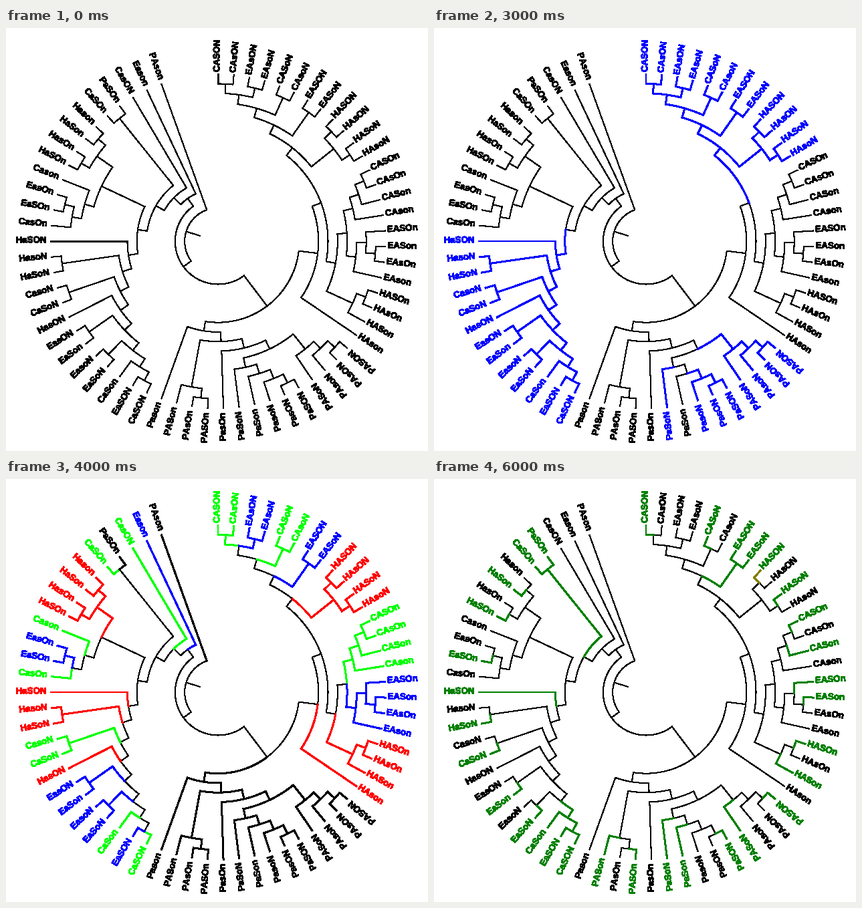
These frames come from a looping animation (631 by 633 pixels, 7000 ms). A matplotlib script:

```python
import matplotlib as mpl
import matplotlib.pyplot as plt
import numpy as np
from matplotlib.animation import FuncAnimation
from matplotlib.patches import PathPatch
from matplotlib.textpath import TextPath
from matplotlib.transforms import Affine2D

W, H, DPI = 631, 633, 100
CX, CY = 317.2, 319.2
TIP = 250            # radius of the leaf tips
LEVEL = 200 / 14     # radial distance between tree levels
STEP = 5.4           # degrees between leaves
FONT = {"family": "Liberation Sans", "weight": "bold"}
BLACK, RED, BLUE = "#000000", "#ff0000", "#0000ff"
LIME, GREEN, OLIVE = "#00ff00", "#008000", "#808000"
HOLD = [0, 0, 1, 2, 3, 4, 5]   # colouring shown in each second

mpl.rcParams["text.kerning_factor"] = 6

UPPER = ("(((((CASON,CAsON),(EAsON,EAsoN)),(CASoN,CAsoN)),(EASON,EASoN)),"
         "((HASON,HAsON),(HASoN,HAsoN)))")
RIGHT = ("(((((CASOn,CAsOn),CASon),CAson),((EASOn,(EASon,EAsOn)),EAson)),"
         "((HASOn,HAsOn),HASon))")
LOWER = ("(((((PASON,PAsON),PAsoN),PASoN),"
         "((((PaSON,PasON),PasoN),PaSon),PaSoN)),PasOn)")
BOTTOM = f"(({LOWER},((PASOn,PAsOn),PASon)),Pason)"
LEFT = ("((((((((CaSON,EaSON),CaSon),(EaSoN,EasoN)),(EaSon,EasON)),HasON),"
        "(CaSoN,CasoN)),(HaSoN,HasoN)),HaSON)")
OUTER = "(((CasOn,(EaSOn,EasOn)),Cason),((HaSOn,HasOn),(HaSon,Hason)))"
REST = f"(((({LEFT},{OUTER}),(CaSOn,PaSOn)),CasON),Eason)"
TREE = f"((((({UPPER},{RIGHT}),HAson),{BOTTOM}),{REST}),PAson)"


class Node:
    def __init__(self, kids=(), name=None, angle=0):
        self.kids = kids
        self.angle = angle
        self.level = 0
        self.names = [name]
        if kids:
            self.angle = (kids[0].angle + kids[-1].angle) / 2
            self.level = 1 + max(k.level for k in kids)
            self.names = [n for k in kids for n in k.names]
        self.radius = TIP - LEVEL * self.level


def parse(text):
    """Read a bracketed tree; returns its root and its leaves in order."""
    stack, leaves, word = [[]], [], ""
    for ch in text:
        if ch in "(),":
            if word:
                leaf = Node(name=word, angle=STEP * len(leaves))
                leaves.append(leaf)
                stack[-1].append(leaf)
                word = ""
            if ch == "(":
                stack.append([])
            elif ch == ")":
                kids = stack.pop()
                stack[-1].append(Node(kids))
        else:
            word += ch
    return stack[0][0], leaves


def polar(radius, deg):
    a = np.radians(deg)
    return CX + radius * np.sin(a), CY - radius * np.cos(a)


def leaf_color(state, name):
    if state == 1:
        return RED if name[1] == "a" else BLUE
    if state == 2:
        marked = name[-1] == "N" and name != "CasON"
        return BLUE if marked or name in ("CaSon", "EaSon") else None
    if state == 3:
        return {"C": LIME, "E": BLUE, "H": RED, "P": BLACK}[name[0]]
    if state == 4:
        return RED if "O" in name else None
    if state == 5:
        return GREEN if "S" in name else None
    return None


def clade_color(state, node):
    colors = {leaf_color(state, n) for n in node.names}
    return colors.pop() if len(colors) == 1 else None


fig = plt.figure(figsize=(W / DPI, H / DPI), dpi=DPI, facecolor="white")
ax = fig.add_axes([0, 0, 1, 1])
ax.set_xlim(0, W)
ax.set_ylim(H, 0)
ax.axis("off")


def px(width):
    return width * 72 / DPI


def stroke(radius, deg):
    x, y = polar(radius, deg)
    return ax.plot(x, y, color=BLACK, lw=px(1.05), antialiased=False,
                   solid_capstyle="projecting", solid_joinstyle="miter")[0]


def label(leaf, outward):
    path = TextPath((0, 0), leaf.names[0], size=13.33, prop=FONT)
    shift = 0 if outward else -path.get_extents().x1
    x, y = polar(253.3 if outward else 257.6, leaf.angle)
    turn = leaf.angle + (-90 if outward else 90)
    place = (Affine2D().translate(shift, -2).scale(1, -1)
             .rotate_deg(turn).translate(x, y))
    return ax.add_patch(PathPatch(path.transformed(place), lw=0,
                                  fc=BLACK, antialiased=False))


root, leaves = parse(TREE)
edges = []


def grow(node):
    for kid, other in zip(node.kids, node.kids[::-1]):
        spoke = stroke(np.array([node.radius, kid.radius]),
                       np.array([kid.angle, kid.angle]))
        sweep = np.linspace(kid.angle, node.angle, 60)
        arc = stroke(node.radius, sweep)
        edges.append((kid, other, node, spoke, arc))
        grow(kid)


grow(root)
stroke(np.array([28.5, root.radius]), np.array([root.angle, root.angle]))
labels = [(leaf.names[0], label(leaf, i < 24)) for i, leaf in enumerate(leaves)]


def paint(line, color, width):
    line.set_color(color or BLACK)
    line.set_linewidth(px(width if color else 1.05))
    line.set_zorder(3 if color else 2)


def update(frame):
    state = HOLD[frame]
    for kid, other, parent, spoke, arc in edges:
        color = clade_color(state, kid)
        thin = state == 1 and all(n[0] == "P" for n in kid.names)
        if state == 5 and kid.names == ["HASON"]:
            color = OLIVE
        plain = parent is root or (thin and not clade_color(state, other))
        width = 1.05 if thin else 2
        paint(spoke, color, width)
        paint(arc, None if plain else color, width)
    for name, patch in labels:
        patch.set_facecolor(leaf_color(state, name) or BLACK)
    return []


anim = FuncAnimation(fig, update, frames=len(HOLD), interval=1000,
                     init_func=lambda: update(0), repeat=True, repeat_delay=0)
plt.show()
```
